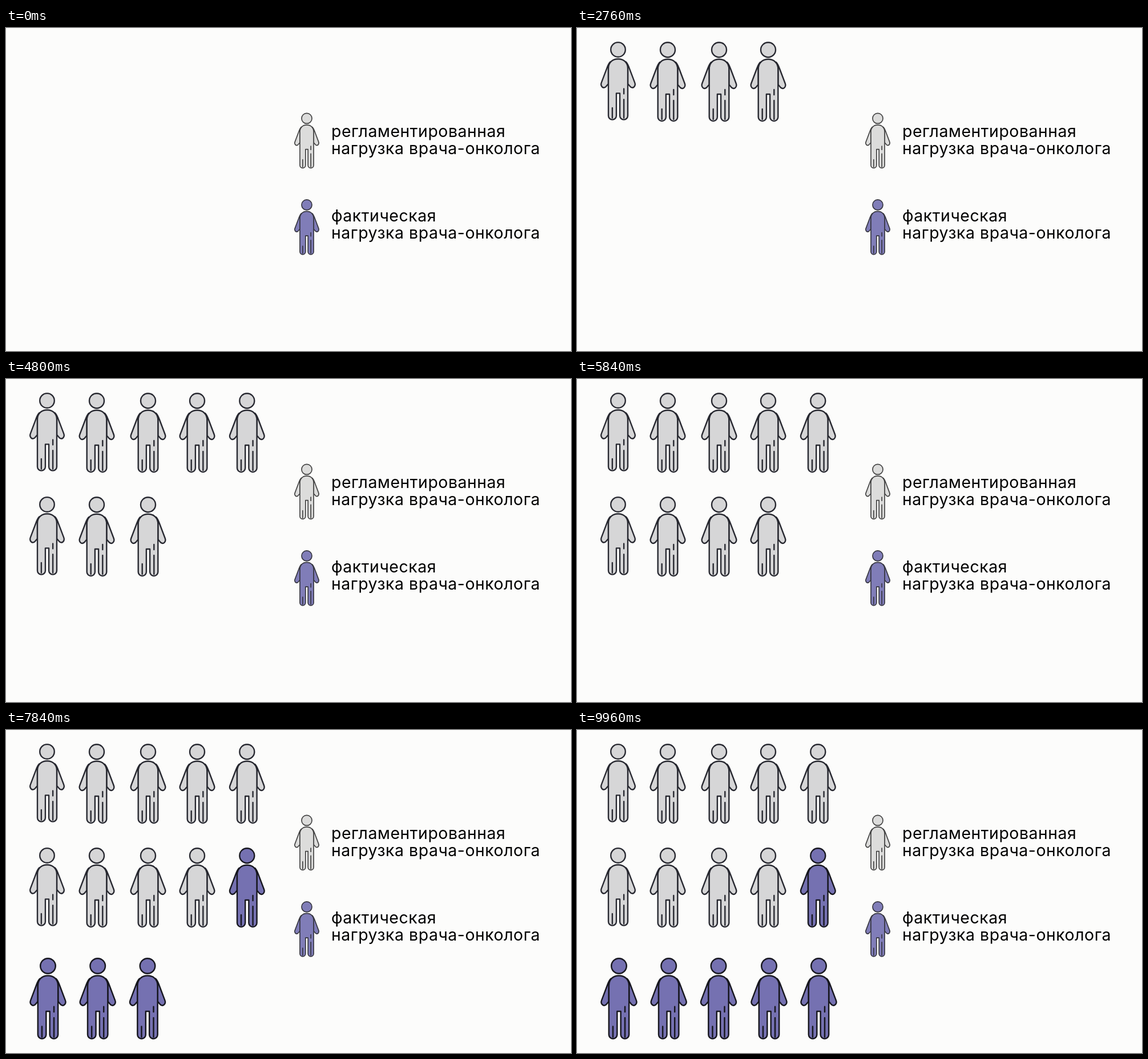
These frames come from a looping animation (990 by 566 pixels, 10000 ms). An HTML page:

```html
<!DOCTYPE html>
<html lang="ru">
<head>
<meta charset="utf-8">
<style>
  html, body { margin: 0; width: 100%; height: 100%; overflow: hidden; background: #fcfcfb; }
  svg { display: block; width: 990px; height: 566px; }
  text { font: 400 28.5px Inter, "Open Sans", sans-serif; letter-spacing: .5px; fill: #000; }
</style>
</head>
<body>
<svg id="stage" viewBox="0 0 990 566">
  <defs>
    <g id="person" stroke-linejoin="round" stroke-linecap="round">
      <path id="arm" d="M-14 36C-17 39 -18 42 -19.5 46L-29.7 73C-32 79 -27 84.5 -22 80.5L-17.3 75V46Z"/>
      <use href="#arm" transform="scale(-1 1)"/>
      <circle cy="14.2" r="13"/>
      <path d="M-17.3 48C-17.3 37 -10 30.8 0 30.8S17.3 37 17.3 48V132a7.1 7.1 0 0 1-14.2 0V92H-3.1V132a7.1 7.1 0 0 1-14.2 0Z"/>
      <path d="M-10.3 118V136M10.3 84V93M10.3 103V136" fill="none"/>
    </g>
  </defs>
  <text x="570" y="190.5">регламентированная</text>
  <text x="570" y="220.5">нагрузка врача-онколога</text>
  <text x="570" y="339">фактическая</text>
  <text x="570" y="369">нагрузка врача-онколога</text>
</svg>
<script>
  const LOOP = 10000, FIRST = 380, STEP = 620;
  const GREY = '#d6d6d7', PURPLE = '#7571b1';
  const stage = document.getElementById('stage');

  function addPerson(x, y, height, fill, stroke) {
    const el = document.createElementNS('http://www.w3.org/2000/svg', 'use');
    const attrs = {
      href: '#person', fill, stroke, 'stroke-width': 2.4,
      transform: `translate(${x} ${y}) scale(${height / 140})`
    };
    for (const name in attrs) el.setAttribute(name, attrs[name]);
    stage.append(el);
    return el;
  }

  addPerson(527, 148.5, 97.5, '#dcdcdb', '#424242');
  addPerson(527, 300, 97.5, '#807db8', '#363640');

  const upper = [72, 159, 249, 335, 422.3];
  const rows = [
    { y: 24, height: 140, xs: upper },
    { y: 206, height: 140, xs: upper },
    { y: 399, height: 143, xs: [73.5, 160.7, 248, 336.5, 423.5] }
  ];

  const people = rows.flatMap(({ y, height, xs }, row) => xs.map((x, col) => {
    const purple = row * 5 + col >= 9;
    const h = col === 0 && row < 2 ? 137.5 : height;
    return addPerson(x, y, h, purple ? PURPLE : GREY, purple ? '#17171f' : '#272830');
  }));

  const start = performance.now();
  function draw(now) {
    const t = Math.max(0, now - start) % LOOP;
    people.forEach((el, i) => {
      el.style.visibility = t >= FIRST + i * STEP ? 'visible' : 'hidden';
    });
    requestAnimationFrame(draw);
  }
  draw(start);
</script>
</body>
</html>
```
